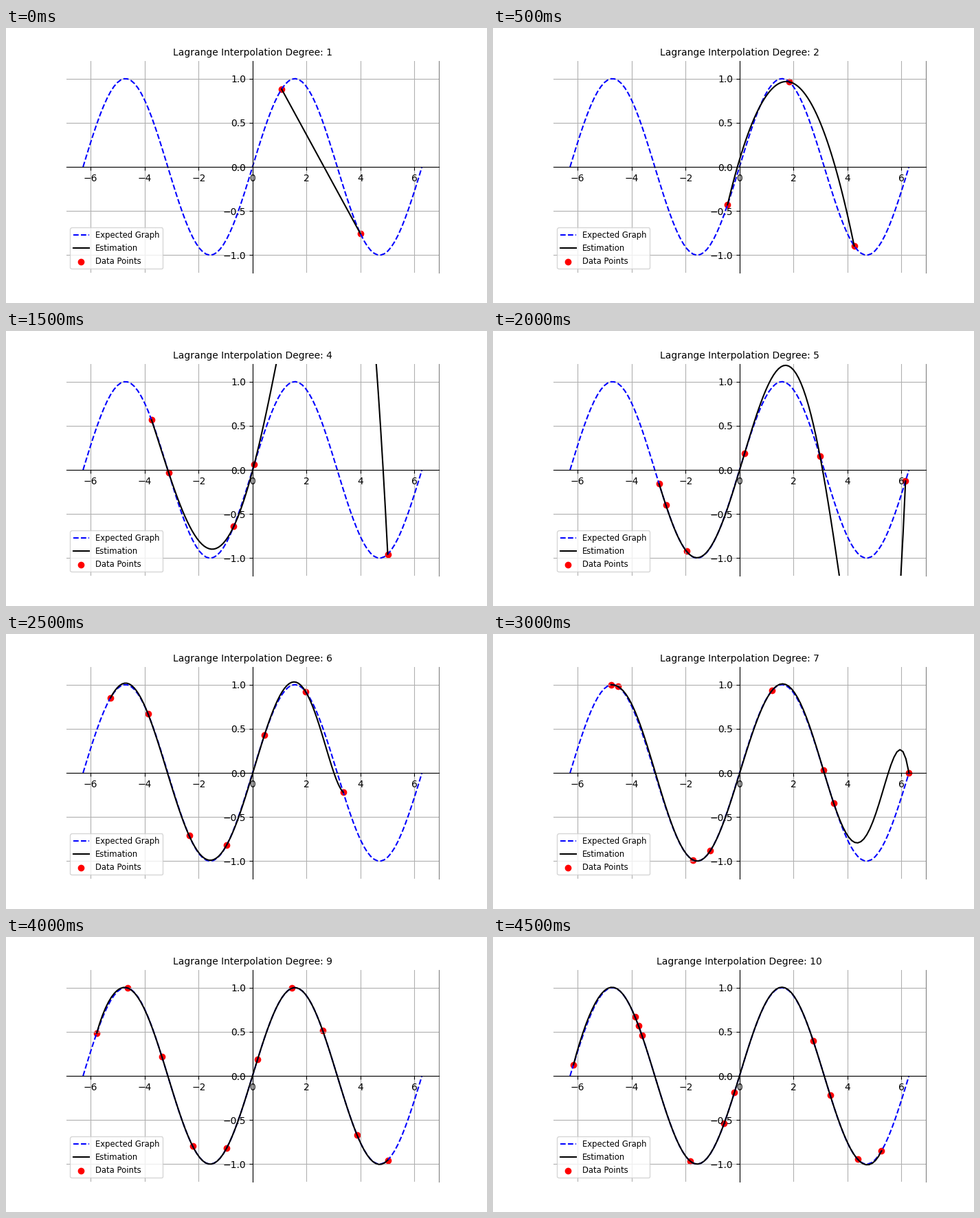
A matplotlib script that plays this animation: 700x400 px, repeating every 5000 ms.

```python
import numpy as np
import matplotlib.pyplot as plt
from matplotlib.animation import FuncAnimation

STEP_MS = 500
X = np.linspace(-2 * np.pi, 2 * np.pi, 100)

# Key sample positions on X per degree; short rows are spread evenly.
KEYS = [
    [58, 81],
    [46, 83],
    [47, 68, 96, 97],
    [20, 25, 44, 50, 89],
    [26, 28, 34, 51, 73, 98],
    [8, 76],
    [12, 14, 36, 41, 59, 74, 77, 99],
    [2, 7, 13, 14, 49, 53, 75, 85, 92],
    [4, 89],
    [1, 19, 20, 21, 35, 45, 48, 71, 76, 84, 91],
]


def sample_points(degree):
    keys = KEYS[degree - 1]
    steps = np.linspace(0, len(keys) - 1, degree + 1)
    index = np.interp(steps, range(len(keys)), keys).round().astype(int)
    return X[index], np.sin(X[index])


def lagrange(xs, ys, t):
    total = np.zeros_like(t)
    for i, (xi, yi) in enumerate(zip(xs, ys)):
        others = np.delete(xs, i)
        total += yi * np.prod((t[:, None] - others) / (xi - others), axis=1)
    return total


fig, ax = plt.subplots(figsize=(7, 4), dpi=100)
ax.plot(X, np.sin(X), "b--", label="Expected Graph")
estimate, = ax.plot([], [], "k-", label="Estimation")
dots = ax.scatter([], [], color="red", label="Data Points")

ax.set_xlim(-2.2 * np.pi, 2.2 * np.pi)
ax.set_ylim(-1.2, 1.2)
ax.grid(True)
ax.spines["left"].set_position("zero")
ax.spines["bottom"].set_position("zero")
ax.spines["top"].set_visible(False)
ax.spines["right"].set_color("gray")
ax.legend(loc="lower left", fontsize="small")
title = ax.set_title("", fontsize=10)


def draw(frame):
    degree = frame + 1
    xs, ys = sample_points(degree)
    t = np.linspace(xs[0], xs[-1], 100)
    estimate.set_data(t, lagrange(xs, ys, t))
    dots.set_offsets(np.column_stack([xs, ys]))
    title.set_text(f"Lagrange Interpolation Degree: {degree}")
    return estimate, dots, title


anim = FuncAnimation(fig, draw, frames=len(KEYS), interval=STEP_MS,
                     init_func=lambda: draw(0), repeat=True, repeat_delay=0)
plt.show()
```
